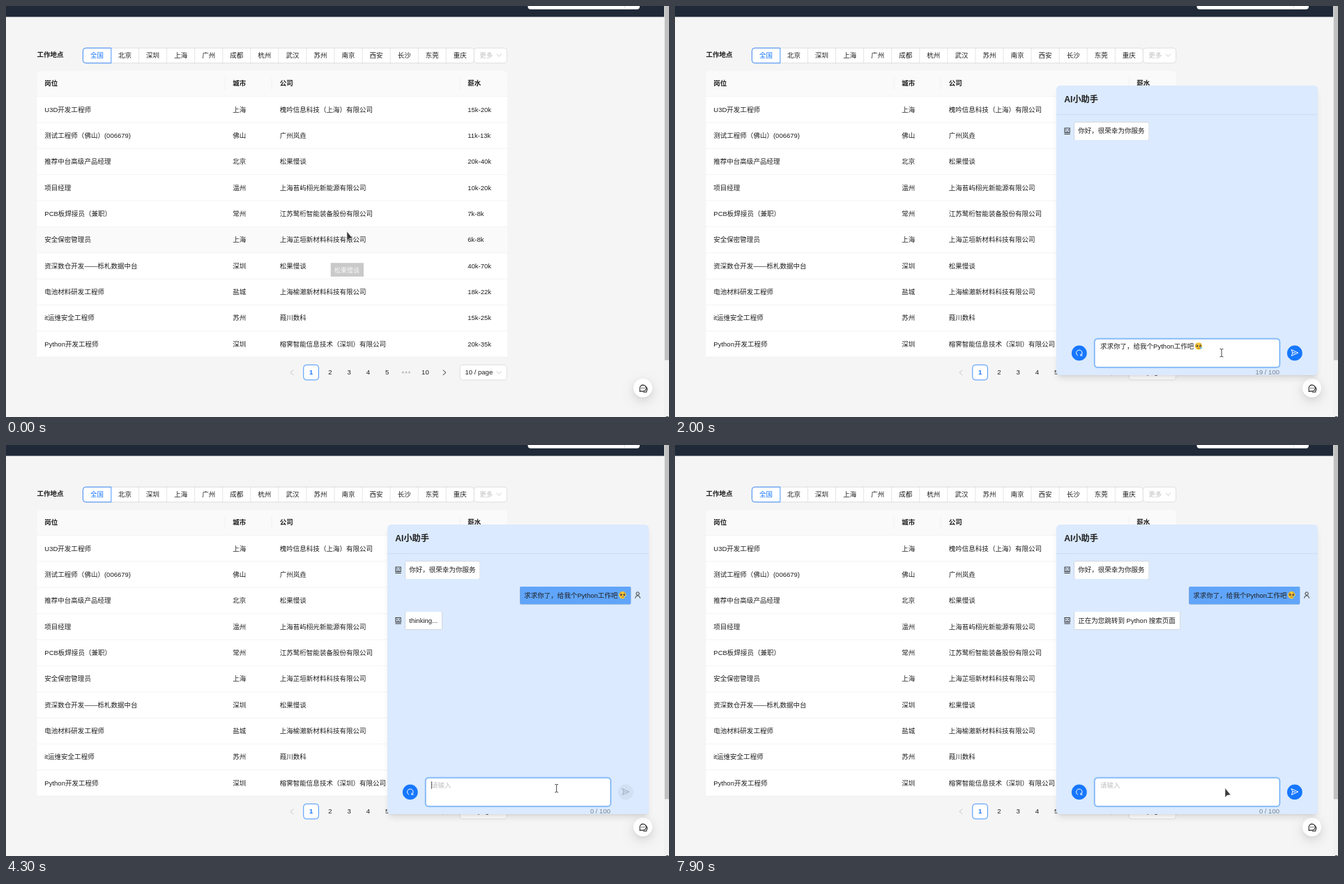
An HTML page that plays this animation: 951 px wide and 589 px high, repeating every 8 s.

```html
<!DOCTYPE html>
<html lang="zh-CN">
<head>
<meta charset="utf-8">
<title>AI小助手</title>
<style>
  html, body { margin: 0; width: 100%; height: 100%; overflow: hidden; background: #f5f5f5; }
  svg { position: absolute; left: 0; top: 0; width: 951px; height: 589px; }
  text { font: 9.52px "Liberation Sans", "Noto Sans CJK SC", "Noto Sans CJK", sans-serif; fill: #1f1f1f; white-space: pre; }
  .bold { font-weight: bold; }
  .blue { fill: #1677ff; }
  .faint { fill: #bfbfbf; }
  .mid { text-anchor: middle; }
  .end { text-anchor: end; fill: #7a828d; }
  .line { fill: none; stroke-linecap: round; stroke-linejoin: round; }
  .bubble { filter: drop-shadow(0 .9px .7px rgba(0,0,0,.5)); }
  #fab, #panel { position: absolute; }
  #fab {
    left: 900.1px; top: 534.2px; width: 27.2px; height: 27.2px; border-radius: 50%;
    box-shadow: 0 4px 11px rgba(0,0,0,.08), 0 2px 4px -2.7px rgba(0,0,0,.12), 0 6px 19px 5.4px rgba(0,0,0,.05);
  }
  #panel {
    left: 546.7px; top: 114.2px; width: 375px; height: 414.8px; border-radius: 5.5px; background: #dbeafe;
    box-shadow: 0 6.8px 10px -2px rgba(0,0,0,.1), 0 2.7px 4px -2.7px rgba(0,0,0,.1);
  }
</style>
</head>
<body>
<svg id="page" viewBox="0 0 951 589"></svg>
<div id="fab"></div>
<div id="panel"></div>
<svg id="chat" viewBox="0 0 951 589"></svg>
<svg id="top" viewBox="0 0 951 589"></svg>
<script>
const $ = id => document.getElementById(id);
const TEXT_DROP = 3.5;
const ROW_TOP = 129.6, ROW_H = 37.35;

// Text is placed by its vertical centre.
const text = (x, cy, s, cls = '', more = '') =>
  `<text x="${x}" y="${cy + TEXT_DROP}" class="${cls}" ${more}>${s}</text>`;
const rect = (x, y, w, h, fill, more = '') =>
  `<rect x="${x}" y="${y}" width="${w}" height="${h}" fill="${fill}" ${more}/>`;
const line = (d, color, width = .7, more = '') =>
  `<path class="line" d="${d}" stroke="${color}" stroke-width="${width}" ${more}/>`;
const circle = (x, y, r, fill, more = '') =>
  `<circle cx="${x}" cy="${y}" r="${r}" fill="${fill}" ${more}/>`;
const group = (id, body, more = '') => `<g id="${id}" ${more}>${body}</g>`;
const border = color => `rx="4" stroke="${color}" stroke-width=".8"`;

const cities = '全国 北京 深圳 上海 广州 成都 杭州 武汉 苏州 南京 西安 长沙 东莞 重庆'.split(' ');
const columns = [55.3, 325.2, 392.8, 662.2];
const jobs = [
  ['U3D开发工程师', '上海', '槐吟信息科技（上海）有限公司', '15k-20k'],
  ['测试工程师（佛山）(006679)', '佛山', '广州岚垚', '11k-13k'],
  ['推荐中台高级产品经理', '北京', '松果慢谈', '20k-40k'],
  ['项目经理', '温州', '上海苔屿栩光新能源有限公司', '10k-20k'],
  ['PCB板焊接员（兼职）', '常州', '江苏鹭桁智能装备股份有限公司', '7k-8k'],
  ['安全保密管理员', '上海', '上海芷垣新材料科技有限公司', '6k-8k'],
  ['资深数仓开发——栎札数据中台', '深圳', '松果慢谈', '40k-70k'],
  ['电池材料研发工程师', '盐城', '上海榆澈新材料科技有限公司', '18k-22k'],
  ['it运维安全工程师', '苏州', '葭川数科', '15k-25k'],
  ['Python开发工程师', '深圳', '榕霁智能信息技术（深圳）有限公司', '20k-35k']
];

function drawHeader() {
  return rect(0, 0, 944, 15.6, '#1f2937') +
    rect(748.5, -10, 160.5, 14.8, '#fff', 'rx="4"') +
    line('M887.5 0V4.6', '#d9d9d9') +
    rect(944, 0, 7, 589, '#f1f1f1') +
    rect(944.8, 0, 6.2, 507.5, '#c1c1c1') +
    rect(946.8, 588, 3.4, 1, '#505050');
}

function drawTabs() {
  const left = 110.4, step = 40.07, right = left + 14 * step;
  let s = text(44.5, 69.7, '工作地点', 'bold') +
    rect(left, 60.2, right - left, 21.6, '#fff', border('#d9d9d9')) +
    rect(right, 60.2, 47.2, 21.6, '#fff', border('#d9d9d9')) +
    text(679.3, 70.3, '更多', 'faint') +
    line('M704.2 68.8l3.2 3.6l3.2-3.6', '#bfbfbf', .8);
  cities.forEach((city, i) => {
    if (i > 1) s += line(`M${left + i * step} 60.2V81.8`, '#d9d9d9');
    s += text(left + (i + .5) * step, 70.3, city, i ? 'mid' : 'mid blue');
  });
  return s + line(`M${left + step} 60.2H${left + 4}q-4 0-4 4v13.6q0 4 4 4H${left + step}Z`, '#1677ff', .8);
}

function drawTable() {
  let s = `<path d="M44.5 130V98.5q0-5.4 5.4-5.4H713.4q5.4 0 5.4 5.4V130Z" fill="#fafafa"/>` +
    rect(44.5, ROW_TOP, 674.3, ROW_H * 10, '#fff') +
    rect(44.5, 0, 674.3, ROW_H, '#fafafa', 'id="hover"');
  ['岗位', '城市', '公司', '薪水'].forEach((name, i) => {
    s += text(columns[i], 110.8, name, 'bold');
    if (i) s += line(`M${[0, 313.9, 381.3, 651.2][i]} 103V120`, '#f0f0f0');
  });
  for (let i = 0; i <= 10; i++) s += line(`M44.5 ${ROW_TOP + ROW_H * i}H718.8`, '#f0f0f0');
  jobs.forEach((job, r) => job.forEach((cell, c) => {
    s += text(columns[c], ROW_TOP + ROW_H * r + 18.5, cell);
  }));
  return s;
}

function drawPagination() {
  let s = rect(426.8, 514.3, 21.6, 21.6, '#fff', border('#1677ff')) +
    text(437.6, 524.9, '1', 'mid bold blue') +
    line('M412 521.9l-4 3.4l4 3.4', '#bfbfbf', .9) +
    line('M627 521.9l4 3.4l-4 3.4', '#1f1f1f', .9) +
    text(601.4, 524.9, '10', 'mid') +
    rect(651.2, 514.3, 67.3, 21.6, '#fff', border('#d9d9d9')) +
    text(658.5, 524.9, '10 / page') +
    line('M704.2 523.6l3.2 3.6l3.2-3.6', '#bfbfbf', .8);
  for (let i = 2; i < 6; i++) s += text(437.6 + 27.28 * (i - 1), 524.9, i, 'mid');
  for (let i = -1; i < 2; i++) s += circle(574 + 4.6 * i, 525, 1.5, '#bfbfbf');
  return s;
}

const robot = cy => `<g transform="translate(562.6 ${cy})">` +
  rect(-3.6, -4.2, 7.2, 6.6, 'none', 'stroke="#222" stroke-width=".9"') +
  circle(-1.5, -1.7, .8, '#222') + circle(1.5, -1.7, .8, '#222') +
  line('M-1.7 .8H1.7', '#222', .8) + line('M-3.8 4.4H3.8', '#222', .9) + '</g>';

const bubble = (x, cy, w, fill, more = '') =>
  rect(x, cy - 12.7, w, 25.4, fill, `rx="1.6" class="bubble" ${more}`);

const emoji = (x, y) => `<g transform="translate(${x} ${y})">` +
  circle(0, 0, 5.2, '#fcc934') +
  circle(-2.2, -.4, 1.5, '#4a3420') + circle(2.2, -.4, 1.5, '#4a3420') +
  circle(-2.6, -.9, .5, '#fff') + circle(1.8, -.9, .5, '#fff') +
  line('M-1.3 2.9Q0 2.1 1.3 2.9', '#5a3c18', .7) +
  line('M-3.8-2.6l1.6-.9M3.8-2.6l-1.6-.9', '#8a6420', .6) +
  circle(3.4, 2.6, 1.4, '#5fb6f2') + '</g>';

const plane = color =>
  line('M884.4 492.7L893.8 497L884.4 501.3L885.8 497ZM885.8 497H889.6', color, 1);

function drawChat() {
  const ask = '求求你了，给我个Python工作吧';
  const greeting = text(558.2, 134.2, 'AI小助手', 'bold', 'style="font-size:12.2px"') +
    line('M546.7 155.6H921.7', '#cbd8ea') +
    robot(179.2) + bubble(572.6, 179.2, 107.2, '#fff') + text(578.3, 178.8, '你好，很荣幸为你服务');
  const question = bubble(737.4, 215.6, 158.8, '#60a5fa') + text(743.3, 215.1, ask) + emoji(884.4, 215) +
    circle(906.1, 213, 2.2, 'none', 'stroke="#222" stroke-width=".9"') +
    line('M902.6 219.3Q903 215.8 906.1 215.8T909.6 219.3', '#222', .9) + robot(251.6);
  const answers =
    group('thinking', bubble(572.6, 251.7, 52.8, '#fff') + text(578.3, 251.2, 'thinking...')) +
    group('reply', bubble(572.6, 251.7, 152, '#fff') + text(578.3, 251.2, '正在为您跳转到 Python 搜索页面'));
  const input = rect(601.9, 477, 265.4, 40.8, '#fff', border('#d9d9d9')) +
    group('focus',
      rect(601, 476.1, 267.2, 42.6, 'none', 'rx="5" stroke="#0591ff" stroke-opacity=".12" stroke-width="1.5"') +
      rect(601.9, 477, 265.4, 40.8, 'none', 'rx="4" stroke="#4096ff" stroke-width=".9"')) +
    text(610, 487.2, '请输入', 'faint', 'id="hint"') +
    group('draft', text(610, 487.2, ask) + emoji(751, 487.4)) +
    rect(609.9, 482.2, .8, 10.6, '#222', 'id="caret"') +
    text(867, 524.8, '0 / 100', 'end', 'id="count"');
  const buttons = circle(579.8, 497.4, 10.9, '#1677ff') +
    line('M577.6 501A4.3 4.3 0 1 1 582 501M582 498.9V501H584.2', '#fff', 1) +
    group('off', circle(888.9, 497.4, 10.5, '#d2e0f4', 'stroke="#d0dcec" stroke-width=".7"') + plane('#a2adbd')) +
    group('on', circle(888.9, 497.4, 10.9, '#1677ff') +
      circle(888.9, 497.4, 10.9, '#4096ff', 'id="lit"') + plane('#fff'));
  return greeting + group('exchange', question + answers) + input + buttons;
}

function drawTop() {
  const edge = 'fill="#3a3a3a" stroke="#e8e8e8" stroke-width=".6" stroke-linejoin="round"';
  const talk = line('M909.2 552.6V547.6A4.5 4.5 0 1 1 913.6 552.1H909.2', '#222', 1.1) +
    line('M918.3 545.8Q921 549.4 918.8 551.6V553.3H914.4', '#222', 1.1) +
    [-2, 0, 2].map(d => circle(913.5 + d, 547.6, .7, '#222')).join('');
  const tip = rect(843, 536.6, 49, 23.2, '#262626', 'rx="4"') +
    '<path d="M891.8 544.4L895.6 548.2L891.8 552Z" fill="#262626"/>' +
    text(848.4, 548, 'AI小助手', '', 'style="fill:#fff"');
  const title = rect(465.8, 368.2, 47.2, 19.6, '#c9c9c9') +
    text(471, 378.2, '松果慢谈', '', 'style="fill:#f8f8f8;font-size:9px"');
  return talk + group('tip', tip) + group('title', title) +
    group('arrow', `<path d="M0 0V13.4L3 10.4L8 9.8Z" ${edge}/>`) +
    group('hand', `<path d="M-1.3 1Q0-.8 1.3 1V5L5.8 6.1Q7.6 6.7 7.3 8.4L6.4 13.6H-.8L-4.2 9Q-4.6 7-2.8 7.4L-1.3 8.4Z" ${edge}/>`) +
    group('beam', line('M-2-5.6Q0-5.6 0-4.6Q0-5.6 2-5.6M0-4.6V4.8M-2 5.8Q0 5.8 0 4.8Q0 5.8 2 5.8', '#333', .9));
}

$('page').innerHTML = drawHeader() + drawTabs() + drawTable() + drawPagination();
$('chat').innerHTML = drawChat();
$('top').innerHTML = drawTop();

// Pointer waypoints: tick (100 ms each), x, y.
const route = [
  [0, 489, 323], [8, 911, 545], [9, 912, 548], [10, 910.3, 548], [14, 792, 500], [16, 784, 497],
  [20, 784, 497], [28, 886, 498], [30, 885.5, 497.6], [31, 885.5, 497.6],
  [37, 790, 491.6], [38, 789.7, 491.9], [78, 789.7, 491.9], [79, 789, 491.6], [80, 789, 491.6]
];
const clamp = v => Math.max(0, Math.min(1, v));
const ramp = (tick, from, to) => clamp((tick - from) / (to - from));
const between = (tick, from, to) => tick >= from && tick < to;
const show = (id, on) => { $(id).style.opacity = +on; };

function pointerAt(tick) {
  const i = route.findIndex(p => p[0] > tick);
  const [t0, x0, y0] = route[i - 1], [t1, x1, y1] = route[i];
  const u = (tick - t0) / (t1 - t0), k = u * u * (3 - 2 * u);
  return [x0 + (x1 - x0) * k, y0 + (y1 - y0) * k];
}

function render(tick) {
  const [x, y] = pointerAt(tick);
  const open = tick >= 10, sent = tick >= 31, answered = tick >= 68, typed = between(tick, 20, 31);

  const onFab = Math.hypot(x - 913.7, y - 547.8) < 13.6;
  const onSend = open && !sent && Math.hypot(x - 888.9, y - 497.4) < 10.9;
  const onInput = open && x > 601 && x < 868 && y > 476 && y < 518 && tick < 79;
  const kind = onFab || onSend ? 'hand' : onInput ? 'beam' : 'arrow';
  for (const id of ['arrow', 'hand', 'beam']) show(id, id === kind);
  $(kind).setAttribute('transform', `translate(${x} ${y})`);

  const row = Math.floor((y - ROW_TOP) / ROW_H);
  show('hover', !open && x < 719 && row < 10);
  $('hover').setAttribute('y', ROW_TOP + ROW_H * row);
  show('title', tick < 1);
  $('fab').style.background = onFab ? 'rgba(0,0,0,.06)' : '#fff';
  show('tip', open ? 1 - ramp(tick, 11, 13) : 0);

  show('panel', open);
  show('chat', open);
  show('exchange', sent);
  show('thinking', !answered);
  show('reply', answered);

  show('focus', ramp(tick, 13, 16) - ramp(tick, 30, 33) + ramp(tick, 40, 43));
  show('hint', !typed);
  show('draft', typed);
  show('caret', between(tick, 14, 20) || between(tick, 41, 52) || between(tick, 62, 72));
  $('count').textContent = (typed ? 19 : 0) + ' / 100';

  const off = ramp(tick, 30, 33) - ramp(tick, 67, 70);
  show('off', off > 0);
  show('on', 1 - off);
  show('lit', ramp(tick, 27, 29) * (tick < 40));
}

const start = performance.now();
function loop() {
  render(Math.floor((performance.now() - start) % 8000 / 100));
  requestAnimationFrame(loop);
}
loop();
</script>
</body>
</html>
```
